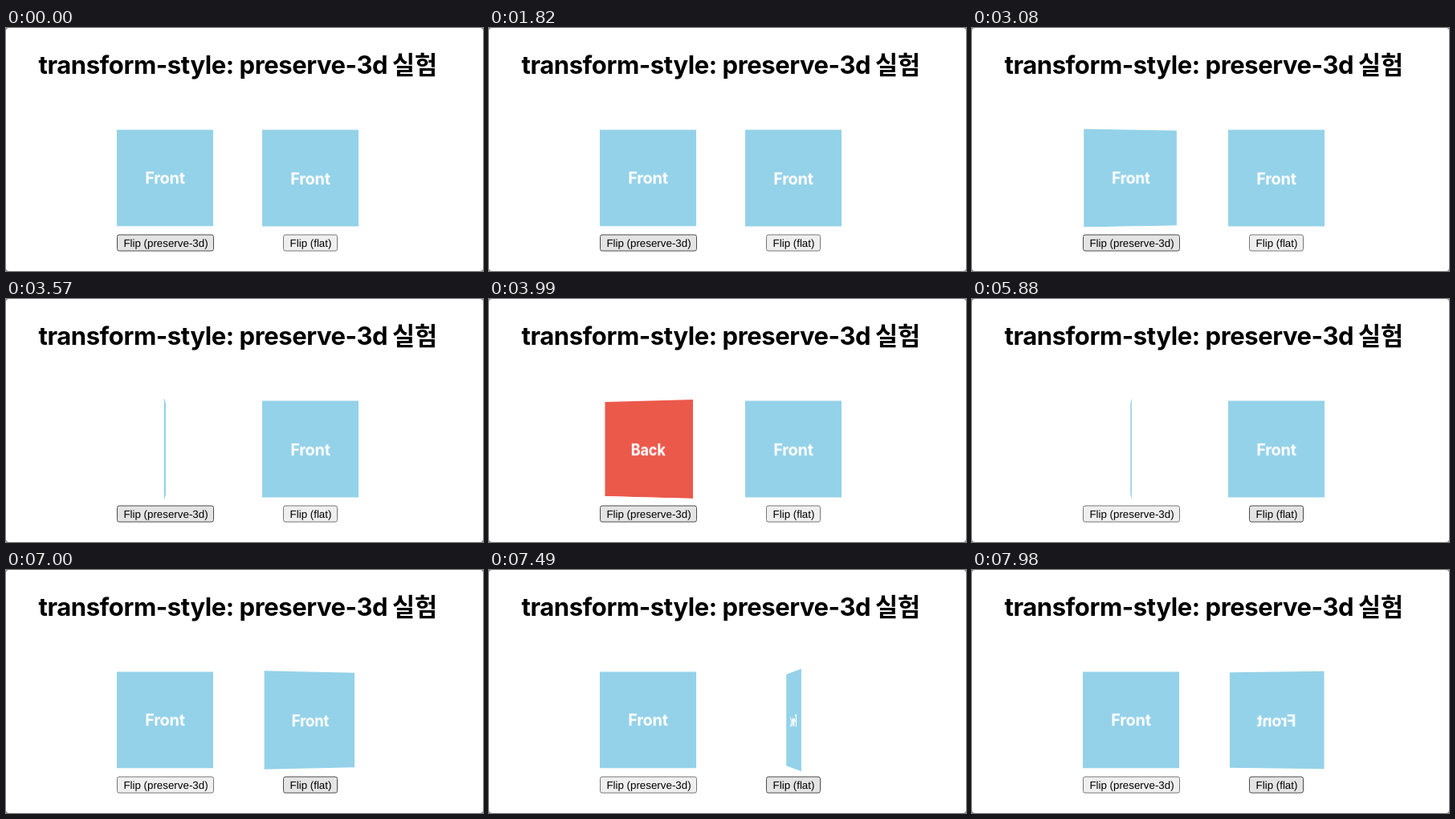
Write an HTML page that moves like this. It is 594 px wide and 302 px high and loops after 8000 ms.

```html
<!DOCTYPE html>
<html lang="ko">
<head>
<meta charset="utf-8">
<title>transform-style: preserve-3d</title>
<style>
  html, body { margin: 0; width: 100%; height: 100%; overflow: hidden; background: #8c8c8c; }
  .page {
    position: absolute; left: 0; top: 0; width: 594px; height: 302px;
    background: #fff; border-radius: 4px; overflow: hidden;
    font-family: Inter, "Noto Sans CJK KR", sans-serif;
  }
  h1 {
    position: absolute; left: 40.5px; top: 26px; margin: 0;
    font-size: 31px; line-height: 40px; font-weight: 700;
    letter-spacing: -.42px; white-space: nowrap; color: #000;
  }
  h1 + h1 {
    left: 481px; top: 24px; letter-spacing: 0; font-size: 30.5px;
    font-family: "Noto Sans CJK KR", "Noto Sans CJK", sans-serif;
  }
  /* Half-pixel offsets go through translate so that they are not snapped */
  .card { position: absolute; top: 126px; width: 120px; height: 120px; translate: 0 .5px; }
  .deep { left: 138px; transform-style: preserve-3d; }
  .flat { left: 319px; }
  .face {
    position: absolute; inset: 0; box-sizing: border-box; padding-top: 1px;
    display: flex; align-items: center; justify-content: center;
    font-size: 20px; font-weight: 700; letter-spacing: -.3px;
    color: #fff; background: #94d2e9;
  }
  .deep .face { backface-visibility: hidden; padding-top: 0; }
  .deep .back { background: #eb594b; transform: rotateY(180deg); padding-top: 1px; }
  .button {
    position: absolute; top: 256px; height: 21px; box-sizing: border-box; translate: 0 .5px;
    display: flex; align-items: center; justify-content: center; padding-left: 1px;
    border: 1px solid; border-radius: 3px; color: #000; white-space: nowrap;
    font: 13.333px "Liberation Sans", Arial, sans-serif;
    text-rendering: geometricPrecision;
  }
  #deepButton { left: 138px; width: 121px; }
  #flatButton { left: 345px; width: 68px; }
</style>
</head>
<body>
<div class="page">
  <h1>transform-style: preserve-3d</h1>
  <h1>실험</h1>
  <div class="card deep" id="deepCard">
    <div class="face">Front</div>
    <div class="face back">Back</div>
  </div>
  <div class="card flat" id="flatCard">
    <div class="face">Front</div>
  </div>
  <div class="button" id="deepButton">Flip (preserve-3d)</div>
  <div class="button" id="flatButton">Flip (flat)</div>
</div>
<script>
  const LOOP = 8000;
  const FULL = 'cubic-bezier(.42, 0, .58, 1)';
  // The two halves of the same curve
  const RISE = 'cubic-bezier(.42, 0, .71, .5)';
  const FALL = 'cubic-bezier(.29, .5, .58, 1)';

  const LOOKS = {
    idle:  { backgroundColor: '#efefef', borderColor: '#767676' },
    hover: { backgroundColor: '#e4e4e4', borderColor: '#4c4c4c' },
    press: { backgroundColor: '#f5f5f5', borderColor: '#8d8d8d' }
  };

  const pose = angle => `perspective(1000px) rotateY(${angle}deg)`;

  const play = (id, frames) =>
    document.getElementById(id).animate(frames, { duration: LOOP, iterations: Infinity });

  // Rows: time, angle, easing towards the next row
  const turn = (id, rows) => play(id, rows.map(([time, angle, easing = 'linear']) => ({
    offset: time / LOOP, transform: pose(angle), easing
  })));

  // Rows: time, look held until the next row
  const press = (id, rows) => {
    const last = rows[rows.length - 1][1];
    play(id, [...rows, [LOOP, last]].map(([time, look]) => ({
      offset: time / LOOP, easing: 'step-end', ...LOOKS[look]
    })));
  };

  turn('deepCard', [
    [0, 0], [2737, 0, FULL], [4417, 180],
    [4870, 180, RISE], [5877, 270, FALL], [6660, 360], [LOOP, 360]
  ]);

  // This flip is still under way when the loop restarts
  document.getElementById('flatCard').animate(
    [0, 180].map(angle => ({ transform: pose(angle) })),
    { delay: 6608, duration: 1670, easing: FULL, fill: 'both' }
  );

  press('deepButton', [
    [0, 'hover'], [210, 'idle'], [1820, 'hover'], [2310, 'press'], [2380, 'hover'],
    [4550, 'press'], [4620, 'hover'], [5250, 'idle']
  ]);
  press('flatButton', [
    [0, 'idle'], [5530, 'hover'], [6230, 'press'], [6300, 'hover'],
    [7840, 'press'], [7910, 'hover']
  ]);

  const begin = performance.now();
  const all = document.getAnimations();
  all.forEach(a => a.pause());
  const draw = () => {
    const time = (performance.now() - begin) % LOOP;
    all.forEach(a => { a.currentTime = time; });
    requestAnimationFrame(draw);
  };
  draw();
</script>
</body>
</html>
```
